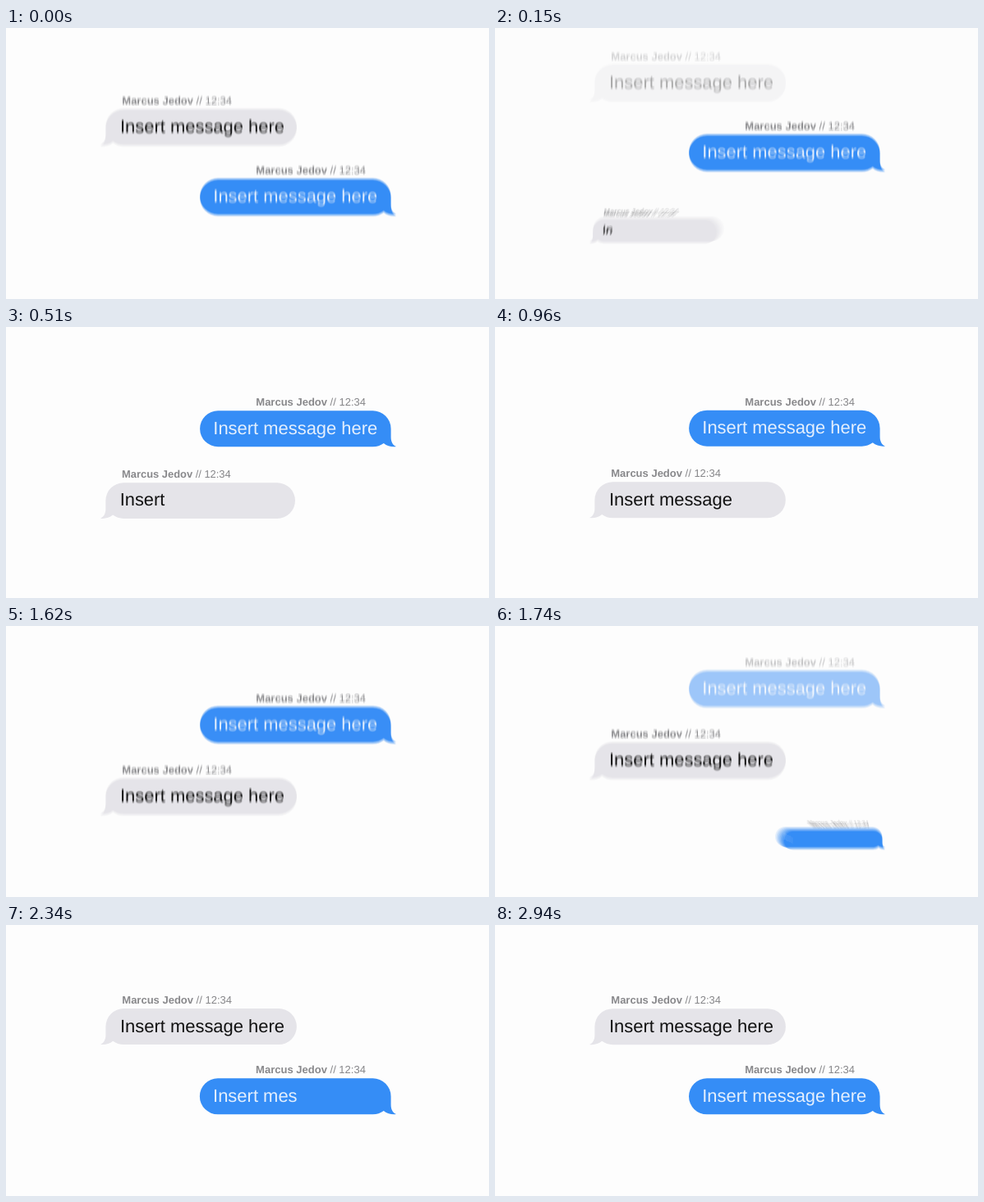
These frames come from a looping animation (588x331 px, 3270 ms). An HTML page with a canvas:

```html
<!DOCTYPE html>
<html lang="en">
<head>
<meta charset="utf-8">
<title>Chat bubbles</title>
<style>
  html, body { margin: 0; width: 100%; height: 100%; overflow: hidden; background: #fdfdfd; }
  canvas { display: block; width: 588px; height: 331px; }
</style>
</head>
<body>
<canvas id="stage" role="img" aria-label="Marcus Jedov // 12:34 – Insert message here"></canvas>
<script>
const W = 588, H = 331, LOOP = 3270, STEP = 30, HALF = 1620;
const BG = '#fdfdfd';
const NAME = 'Marcus Jedov', CLOCK = ' // 12:34', MESSAGE = 'Insert message here';
const FONT = '"Liberation Sans", Arial, Helvetica, sans-serif';

const LEAD = 8;            // ms of travel already done when a phase begins
const SPEED = 0.0042;      // progress per ms before the bounce
const CHAR_MS = 69;
const SHUTTER = 11, SAMPLES = 9;
const BUBBLE_H = 44;

// Bubble with its tail tip at the lower left corner (0, 0)
const bubble = new Path2D(
  'M6.4 -22 A22 22 0 0 1 28.4 -44 H216.9 A22 22 0 0 1 216.9 0 H28.4 ' +
  'C23.4 0 18.9 -1.5 15.2 -4.3 C10.9 -.6 4.9 .5 0 -.2 C4.5 -2.2 6.4 -6.5 6.4 -12 Z');

// x: tail tip, textX and labelX: offsets from it
const grey = { x: 115, flip: 1, fill: '#e5e4e9', ink: '#111', textX: 24, labelX: 26.3 };
const blue = { x: 475, flip: -1, fill: '#358df6', ink: '#e4effd', textX: -222.7, labelX: -170.7 };

// Each phase: one bubble leaves, one stays, a new one comes in (y: top edges)
const phases = [
  { leaving: grey, leaveY: 102.2, staying: blue, stayY: 187.4, coming: grey, comeY: 189.2, travel: 85.8 },
  { leaving: blue, leaveY: 101.6, staying: grey, stayY: 189.2, coming: blue, comeY: 187.4, travel: 87 }
];

const dpr = window.devicePixelRatio || 1;
const stage = document.getElementById('stage');
const layer = document.createElement('canvas');
for (const c of [stage, layer]) {
  c.width = Math.round(W * dpr);
  c.height = Math.round(H * dpr);
}
const out = stage.getContext('2d');
const ctx = layer.getContext('2d');
ctx.scale(dpr, dpr);
ctx.textRendering = 'geometricPrecision';

// Linear travel, then a decaying overshoot
function progress(ms) {
  const s = SPEED * (ms + LEAD);
  if (s < 1) return Math.max(0, s);
  const t = (s - 1) / SPEED / 1000;
  return 1 + 0.052 * Math.sin(2 * Math.PI * 2.1 * t) * Math.exp(-4.4 * t);
}

function write(text, font, color, x, y) {
  ctx.font = font + ' ' + FONT;
  ctx.fillStyle = color;
  ctx.fillText(text, x, y);
  return x + ctx.measureText(text).width;
}

function drawMessage(look, top, scale, text) {
  ctx.save();
  ctx.translate(look.x, top + BUBBLE_H);
  ctx.scale(scale, scale);
  ctx.save();
  ctx.scale(look.flip, 1);
  ctx.fillStyle = look.fill;
  ctx.fill(bubble);
  ctx.restore();
  const labelY = -BUBBLE_H - 6.1;
  const end = write(NAME, 'bold 13px', '#88888b', look.labelX, labelY);
  write(CLOCK, '13px', '#858588', end, labelY);
  write(text, '21.95px', look.ink, look.textX, -15.6);
  ctx.restore();
}

function fillStage(alpha) {
  ctx.globalAlpha = alpha;
  ctx.fillStyle = BG;
  ctx.fillRect(0, 0, W, H);
  ctx.globalAlpha = 1;
}

function drawScene(phase, ms, typed) {
  const s = progress(ms);
  const shift = phase.travel * s;
  fillStage(1);
  if (s < 1 && ms < 230) {
    drawMessage(phase.leaving, phase.leaveY - shift, 1, MESSAGE);
    fillStage(s);
  }
  drawMessage(phase.staying, phase.stayY - shift, 1, MESSAGE);
  if (s > 0.08) drawMessage(phase.coming, phase.comeY + phase.travel - shift, s, typed);
}

function render(time) {
  const t = Math.floor((time % LOOP) / STEP) * STEP;
  const second = t >= HALF;
  const phase = phases[second ? 1 : 0];
  const ms = second ? t - HALF : t;
  const typed = MESSAGE.slice(0, Math.floor((ms + LEAD) / CHAR_MS));
  // Average several moments for motion blur while the list travels
  const count = ms < 240 ? SAMPLES : 1;
  for (let i = 0; i < count; i++) {
    const offset = count > 1 ? (i / (count - 1) - 0.5) * SHUTTER : 0;
    drawScene(phase, ms + offset, typed);
    out.globalAlpha = 1 / (i + 1);
    out.drawImage(layer, 0, 0);
  }
}

const start = performance.now();
function tick() {
  render(performance.now() - start);
  requestAnimationFrame(tick);
}
tick();
</script>
</body>
</html>
```
